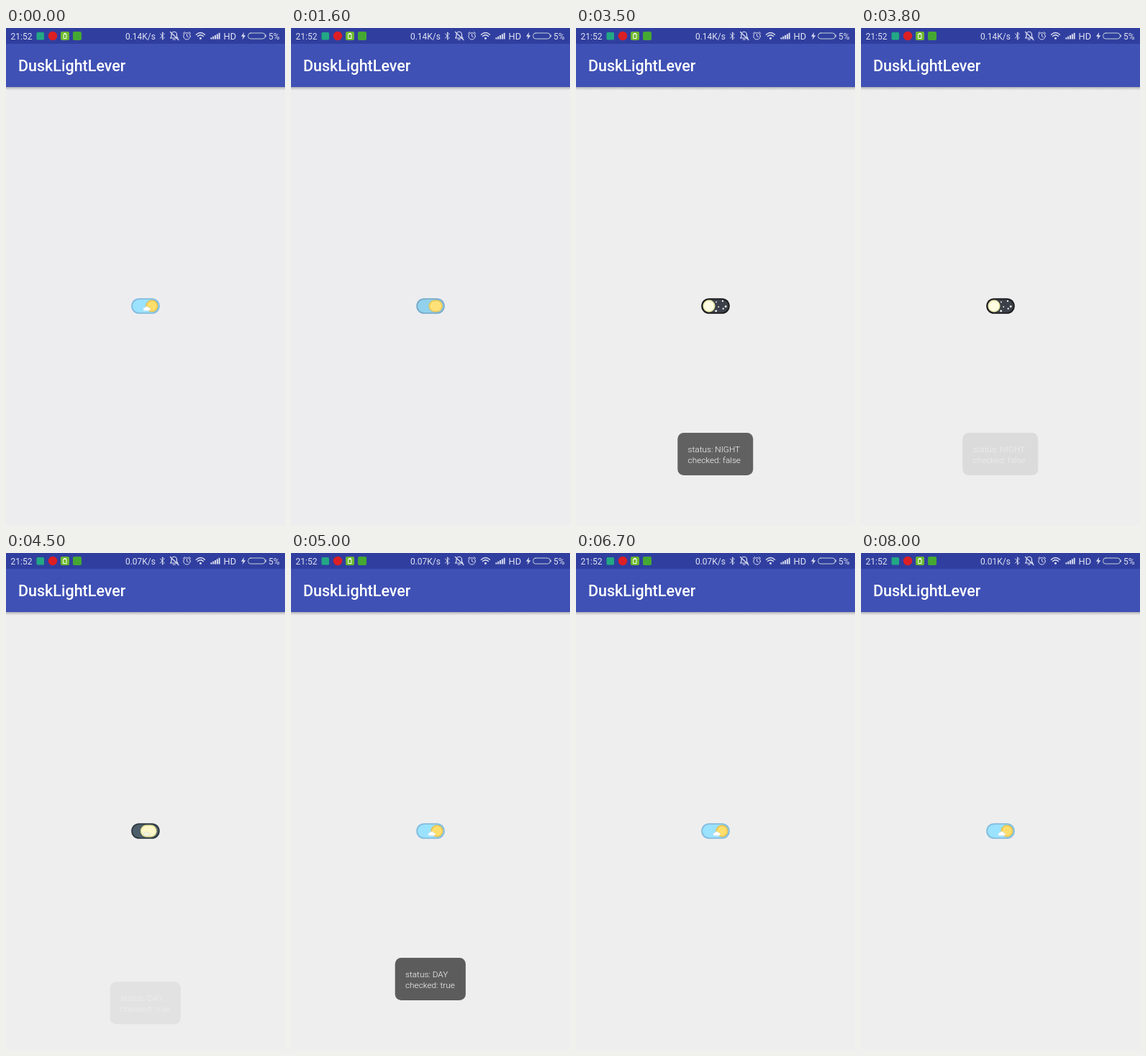
Recreate the animation shown at these times as an HTML page with a canvas. Size 388x690 px, loop 8200 ms.

```html
<!DOCTYPE html>
<html lang="en">
<head>
<meta charset="utf-8">
<title>DuskLightLever</title>
<style>
html, body { margin: 0; width: 388px; height: 690px; overflow: hidden; background: #eee; }
canvas, svg { position: absolute; left: 0; top: 0; width: 388px; height: 690px; display: block; }
text { font-family: Roboto, "Open Sans", sans-serif; white-space: pre; }
.bar text { font-size: 12px; fill: #dfe2f1; }
.title { font-size: 21.5px; font-weight: 500; fill: #fff; }
#toast text { font-size: 11.8px; font-weight: 300; fill: #fff; }
</style>
</head>
<body>
<canvas id="stage"></canvas>
<svg viewBox="0 0 388 690">
  <g class="bar">
    <text x="6.5" y="15.5">21:52</text>
    <text id="speed" x="208" y="15.5" text-anchor="end">0.14K/s</text>
    <text x="302.5" y="15.5" style="font-size:12.8px">HD</text>
    <text x="365" y="15.5">5%</text>
  </g>
  <text class="title" x="17" y="60">DuskLightLever</text>
  <g id="toast">
    <rect id="box" y="562" height="59" rx="8.5" fill="#5c5c5c"/>
    <text id="line1" y="589"></text>
    <text id="line2" y="604"></text>
  </g>
</svg>
<script>
const LOOP = 8200, STEP = 100, W = 388, H = 690;
const $ = id => document.getElementById(id);
const canvas = $('stage'), c = canvas.getContext('2d');
const ratio = window.devicePixelRatio || 1;
canvas.width = W * ratio;
canvas.height = H * ratio;
c.scale(ratio, ratio);

function ramp(t, from, to) {
  const u = Math.min(1, Math.max(0, (t - from) / (to - from)));
  return u * u * (3 - 2 * u);
}

// Rises over a..b, falls over d..e
const pulse = (t, a, b, d, e) => ramp(t, a, b) - ramp(t, d, e);

function mix(a, b, u) {
  return `rgb(${a.map((v, i) => Math.round(v + (b[i] - v) * u))})`;
}

function pill(x, y, w, h, r, fill) {
  c.fillStyle = fill;
  c.beginPath();
  c.roundRect(x, y, w, h, r);
  c.fill();
}

function dot(x, y, r, fill) {
  c.fillStyle = fill;
  c.beginPath();
  c.arc(x, y, r, 0, 7);
  c.fill();
}

function stroke(path, width = 1) {
  c.lineWidth = width;
  c.stroke(new Path2D(path));
}

function rect(y, h, fill) {
  c.fillStyle = fill;
  c.fillRect(0, y, W, h);
}

function statusIcons() {
  pill(42.5, 6, 10.5, 10.5, 1.5, '#22a884');
  dot(65, 11, 6.2, '#dc1f24');
  pill(76, 5, 12, 12, 2, '#6cb92e');
  pill(93, 5, 12, 12, 2, '#45a832');
  c.strokeStyle = '#fff';
  stroke('M80 8.5H84V14.5H80ZM81 7.5H83');

  c.strokeStyle = c.fillStyle = '#dfe2f1';
  c.lineCap = c.lineJoin = 'round';
  stroke('M214.5 8L220 13.7L217.5 16.2V5.8L220 8.3L214.5 14');
  stroke('M228.5 14H239L237.5 12V9A3.7 3.7 0 0 0 230 9V12ZM232.3 16H235.2M228.5 5.5L240 16.5', 1.2);
  stroke('M256.3 11.3A4.7 4.7 0 1 1 246.9 11.3A4.7 4.7 0 1 1 256.3 11.3M251.6 8.5V11.5L253.5 12.5M246.5 7.5L248.7 5.6M256.7 7.5L254.5 5.6');
  stroke('M264.5 9.2Q270.5 3.8 276.5 9.2M266.5 11.6Q270.5 8 274.5 11.6', 1.4);
  dot(270.5, 14.2, 1.5, '#dfe2f1');
  for (let i = 0; i < 5; i++) c.fillRect(284.5 + i * 2.8, 13.2 - i * 1.6, 1.9, 2.3 + i * 1.6);
  c.fill(new Path2D('M331.2 5.8L327 11.8H329.8L328.6 16.2L333.2 10.2H330.3Z'));
  c.strokeStyle = '#c3d3d6';
  c.beginPath();
  c.roundRect(336.7, 7, 23.6, 8, 3.5);
  c.lineWidth = 1;
  c.stroke();
  c.fillRect(360.6, 9.4, 1.2, 3.2);
}

function cloud(grow, fill) {
  for (let i = -1; i <= 1; i++)
    dot(195.7 + i * 2.9, 389.4 + Math.abs(i), 2.4 - .7 * Math.abs(i) + grow, fill);
  c.fillRect(192.8 - grow, 390.3, 5.8 + 2 * grow, 1.8 + grow);
}

function toggle(t) {
  const slide = pulse(t, 1500, 2000, 4200, 4650);
  const night = pulse(t, 1500, 2000, 4350, 4900);
  const stars = pulse(t, 1600, 2000, 4200, 4500);
  const clouds = 1 - pulse(t, 1500, 1600, 4400, 4600);
  const w = 17 + 8 * Math.sin(Math.PI * slide);
  const mid = 203 - 18 * slide;

  pill(174.2, 375.2, 39.6, 21.6, 10.8, mix([130, 187, 222], [28, 28, 30], night));
  pill(176, 377, 36, 18, 9, mix([155, 226, 255], [60, 65, 73], night));

  c.globalAlpha = stars;
  [[195, 380.5], [204, 379.2], [208.2, 386.7], [198.2, 387.2], [204.7, 389.7], [194.7, 392.8]]
    .forEach(([x, y], i) => dot(x, y, .9 + i % 3 * .25, '#fff'));
  c.globalAlpha = 1;

  pill(mid - w / 2, 377.5, w, 17, 8.4, mix([226, 190, 74], [233, 234, 166], night));
  pill(mid - w / 2 + 1.5, 379, w - 3, 14, 7, mix([255, 222, 108], [255, 253, 226], night));

  c.globalAlpha = clouds;
  cloud(.5, mix([214, 226, 232], [200, 201, 150], night));
  cloud(0, '#fff');
  c.globalAlpha = 1;
}

function toast(t) {
  const day = t >= 4200;
  const alpha = day ? pulse(t, 4430, 4850, 6430, 6700) : pulse(t, 1700, 2000, 3450, 3900);
  const drop = day ? 36 * (1 - ramp(t, 4430, 4850)) : 0;
  const x = day ? 144.7 : 141.3;
  $('toast').setAttribute('opacity', alpha);
  $('toast').setAttribute('transform', `translate(0 ${drop})`);
  $('box').setAttribute('x', x);
  $('box').setAttribute('width', 2 * (193.8 - x));
  $('line1').setAttribute('x', x + 14.3);
  $('line2').setAttribute('x', x + 14.3);
  $('line1').textContent = 'status: ' + (day ? 'DAY' : 'NIGHT');
  $('line2').textContent = 'checked: ' + day;
}

function draw(t) {
  rect(0, H, t < 2000 ? '#ededf0' : '#eeeeee');
  const shade = c.createLinearGradient(0, 82, 0, 86.5);
  shade.addColorStop(0, 'rgba(0,0,0,.24)');
  shade.addColorStop(1, 'rgba(0,0,0,0)');
  rect(82, 5, shade);
  rect(22, 60, '#3f51b5');
  rect(0, 22, '#303f9f');
  statusIcons();
  toggle(t);
  toast(t);
  $('speed').textContent = (t < 4100 ? '0.14' : t < 8000 ? '0.07' : '0.01') + 'K/s';
}

const start = performance.now();
let last = -1;
function tick() {
  const t = Math.floor((performance.now() - start) % LOOP / STEP) * STEP;
  if (t !== last) draw(last = t);
  requestAnimationFrame(tick);
}
tick();
</script>
</body>
</html>
```
